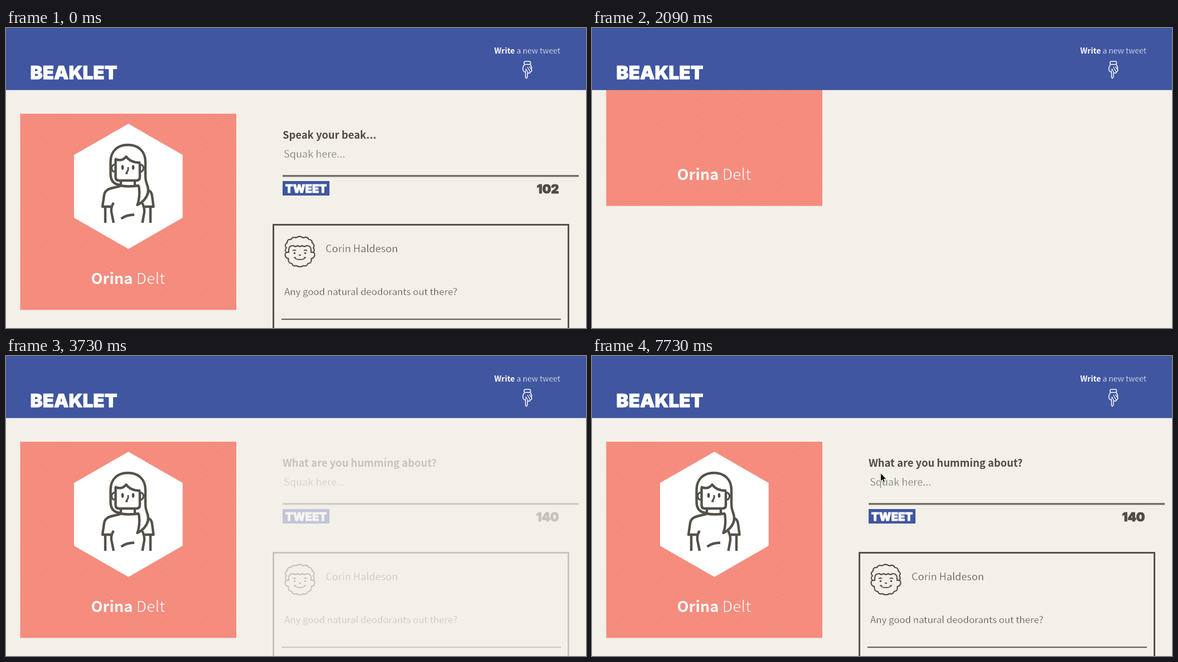
An HTML page that plays this animation: 1040x539 px, repeating every 8 s.

```html
<!DOCTYPE html>
<html lang="en">
<head>
<meta charset="utf-8">
<title>Feed reload</title>
<style>
  html, body { margin: 0; width: 100%; height: 100%; overflow: hidden; background: #f3f0ea; }
  svg { display: block; width: 100%; height: 100%; }
  text { font-family: "Noto Sans CJK JP", "Noto Sans CJK SC", "Noto Sans CJK", "Open Sans", sans-serif; font-weight: 300; white-space: pre; }
  .bold { font-weight: 700; }
  /* A hairline in the backdrop colour slims the regular weight. */
  .slim { stroke: #f3f0ea; stroke-width: .4; }
  .block { font-family: Inter, Roboto, sans-serif; font-weight: 900; stroke-width: .9; stroke-linejoin: bevel; }
  .line { fill: none; stroke: #545149; stroke-linecap: butt; stroke-linejoin: round; }
  .dark { fill: #504b45; }
  .dark.block { stroke: #504b45; }
  .white { fill: #fff; }
  .white.block { stroke: #fff; }
</style>
</head>
<body>
<svg viewBox="0 0 1040 539">
  <defs>
    <pattern id="weave" width="18" height="15" patternUnits="userSpaceOnUse">
      <rect width="18" height="15" fill="#f78e80"/>
      <path d="M0 7.500L9 0L18 7.500L9 15ZM4.500 7.500L9 3.700L13.500 7.500L9 11.200ZM0 3.700L4.500 0M18 3.700L13.500 0M0 11.300L4.500 15M18 11.300L13.500 15" fill="none" stroke="#e58072" stroke-width="1" opacity=".5"/>
    </pattern>
    <filter id="soft" x="-10%" y="-60%" width="120%" height="220%">
      <feDropShadow dx="0" dy="0" stdDeviation="2" flood-color="#000" flood-opacity=".3"/>
    </filter>
    <filter id="lift" x="-50%" y="-50%" width="200%" height="200%">
      <feDropShadow dx="0" dy="1" stdDeviation="1" flood-color="#000" flood-opacity=".35"/>
    </filter>
  </defs>

  <rect width="1040" height="539" fill="#f3f0ea"/>

  <g id="card">
    <rect id="panel" x="25.500" y="154" width="387.500" height="352.500" fill="url(#weave)"/>
    <g id="portrait">
      <path d="M219.500 172L316.700 228V341L219.500 397L122 341V228Z" fill="#fff"/>
      <g class="line" stroke-width="4.400">
        <path d="M205 282C193 281 187.500 274 187.500 262V241C187.500 221 200 210 218.500 210C237 210 250 221 250 241V267C250 282 257 282 254.500 296C252 308 243 314 235.500 318C240 306 240 296 238 283"/>
        <path d="M196.500 236V268Q196.500 274 202.500 274H233.500Q240 274 240 268V243"/>
        <path d="M195 235Q208 241 215.500 231Q223 242 241 242"/>
        <path d="M195 245q-6 2 -5.500 7q.500 6 5.500 6.500M241 245q6 2 5.500 7q-.500 6 -5.500 6.500" stroke-width="3.200"/>
        <path d="M219 250V255L215.500 261H218.500" stroke-width="3"/>
        <path d="M206 274V283M231 274V283M205 283Q218 286 239 283"/>
        <path d="M207 283C196 288 178 286 176 300L173 321H189M253 291C260 292 261.500 297 262 302L264.500 321H249"/>
        <path d="M178 321V350M193 314Q187 323 189.500 333L193 350M259 321V350M244 314Q249.500 324 247.500 334L244.500 350"/>
        <path d="M206.500 342.500Q216 335.500 230 335.500"/>
      </g>
      <ellipse class="dark" cx="209" cy="250.500" rx="2.300" ry="4.300"/>
      <ellipse class="dark" cx="228" cy="250.500" rx="2.300" ry="4.300"/>
    </g>
    <text id="owner" class="white" x="219" y="460" font-size="27.3" text-anchor="middle"><tspan class="bold">Orina</tspan><tspan stroke="#f58b7d" stroke-width=".7"> Delt</tspan></text>
  </g>

  <g id="feed">
    <text id="prompt" class="dark bold" x="496" y="199" font-size="18.4"></text>
    <text class="slim" x="498" y="232.500" font-size="18.1" fill="#757575">Squak here...</text>
    <rect x="496" y="264" width="531" height="3.500" fill="#737069"/>
    <rect x="496" y="275" width="84" height="26" fill="#4056a1"/>
    <text class="block white" x="538" y="296" font-size="20.2" text-anchor="middle">TWEET</text>
    <text id="count" class="block dark" x="991.500" y="296.500" font-size="22" text-anchor="end"></text>
    <path class="line" d="M479.500 545V353.500H1008.500V545" stroke-width="3" style="stroke-linejoin:miter"/>
    <path class="line" d="M494 523.300H995" stroke-width="2"/>
    <g class="line" stroke-width="2.200">
      <path d="M504 404q-6 -5 -1 -9q-5 -5 1 -9q0 -7 7 -6q3 -6 9 -3q6 -5 13 0q7 -3 10 3q6 0 6 6q6 4 2 9q4 5 -1 9"/>
      <path d="M507 404V399q0 -8 8 -8q4 3 8 0q4 3 8 0q4 3 8 0q8 0 8 8V404"/>
      <path d="M507 403q-7 -1 -6.500 5q1 6 6 6q-1 9 6 9q2 6 8 4q6.500 4 13 0q6 2 8 -4q7 0 6 -9q5 0 6 -6q.500 -6 -6 -5"/>
      <path d="M516 412.500h4M534 412.500h4M518 412.500q1 3.500 9 3.500t9 -3.500M514 400q3 -2 6 0M534 400q3 -2 6 0M525 408h4" stroke-width="1.800"/>
    </g>
    <circle class="dark" cx="517.500" cy="404.500" r="1.700"/>
    <circle class="dark" cx="536.500" cy="404.500" r="1.700"/>
    <text class="dark slim" x="573" y="403" font-size="18.1">Corin Haldeson</text>
    <text class="dark slim" x="499" y="479.500" font-size="16.8">Any good natural deodorants out there?</text>
  </g>

  <rect width="1040" height="111.500" fill="#4056a1"/>
  <text class="block white" x="43.500" y="91.700" font-size="33.2">BEAKLET</text>
  <g id="nav">
    <text class="white" x="994" y="45.500" font-size="13.95" text-anchor="end"><tspan class="bold">Write</tspan><tspan stroke="#4056a1" stroke-width=".3"> a new tweet</tspan></text>
    <g fill="none" stroke="#fff" stroke-width="1.500" stroke-linejoin="round">
      <rect x="929" y="60" width="11.500" height="5.500" rx="2"/>
      <path d="M930 65.500Q926 70 927 75.500Q929 79.500 931.500 79V88.500Q933 92 934.700 88.500L935.300 80q4 3 5 -1q3.500 -1 2 -5q1 -4 -2.300 -8.500"/>
      <path d="M932 73l4 7M935 70l5 9M938.500 69l3.700 6M931.500 79l1 -5" stroke-width="1.200"/>
    </g>
  </g>

  <g id="status">
    <path d="M-1 540V520.500H343Q347.500 520.500 347.500 525V540Z" fill="#dee1e6" stroke="#b3b6bb" filter="url(#soft)"/>
    <text x="-.5" y="535" font-size="11.5" fill="#3c4043" style="font-family:Inter,Roboto,sans-serif;font-weight:400">Waiting for localhost...</text>
  </g>

  <rect id="caret" x="497" y="213" width="1.200" height="26" fill="#333"/>
  <path id="beam" d="M517.500 224V237" stroke="#8b8985" stroke-width="1"/>
  <path id="cursor" d="M0 0V14.500L3.300 11.500L5.500 16.500L7.900 15.400L5.800 10.600H10.300Z" fill="#000" stroke="#fff" stroke-width=".9" filter="url(#lift)"/>
</svg>
<script>
  const LOOP = 8000;
  // Screen refreshes: first time, last time, number of steps.
  const RUNS = [
    [1350, 2390, 8], [2540, 3280, 6], [3730, 4030, 3], [5070, 6100, 8],
    [6250, 6700, 4], [7140, 7430, 3], [7730, 7730, 1]
  ];
  const $ = id => document.getElementById(id);
  const progress = (t, start, length) => Math.min(1, Math.max(0, (t - start) / length));
  const swing = p => (1 - Math.cos(Math.PI * p)) / 2;
  const show = (id, on) => $(id).setAttribute('visibility', on ? 'visible' : 'hidden');
  const move = (id, x, y) => $(id).setAttribute('transform', `translate(${x} ${y})`);
  const label = (id, value) => { if ($(id).textContent !== value) $(id).textContent = value; };

  function refreshTime(t) {
    let held = 0;
    for (const [first, last, steps] of RUNS) {
      if (t < first) break;
      const gap = steps > 1 ? (last - first) / (steps - 1) : 1;
      held = first + Math.min(steps - 1, Math.floor((t - first + 2) / gap)) * gap;
    }
    return held;
  }

  function draw(time) {
    const t = refreshTime(time);
    const before = t < 1490;
    const wide = !before && t < 1790;

    label('prompt', before ? 'Speak your beak...' : 'What are you humming about?');
    label('count', before ? '102' : '140');
    move('nav', wide ? 14.5 : 0, 0);
    show('status', t >= 1350 && t < 1930);

    $('panel').setAttribute('x', wide ? 26.5 : 25.5);
    $('panel').setAttribute('width', wide ? 392.5 : 387.5);
    $('owner').setAttribute('x', wide ? 222.7 : 219);
    move('card', 0, before ? 0 : -395 * (1 - swing(progress(t, 1527, 1094))));
    $('portrait').setAttribute('opacity', before ? 1 : swing(progress(t, 2890, 390)));
    $('feed').setAttribute('opacity', before ? 1 : swing(progress(t, 3591, 400)));

    const travel = swing(progress(t, 5070, 1030));
    show('cursor', t >= 5070);
    move('cursor', 1019 - 501.5 * travel, 142 + 68.5 * travel);
    show('beam', t >= 6540);
    show('caret', t >= 7280 && t < 7730);
  }

  const origin = performance.now();
  function tick(now) {
    draw(Math.max(0, now - origin) % LOOP);
    requestAnimationFrame(tick);
  }
  draw(0);
  requestAnimationFrame(tick);
</script>
</body>
</html>
```
